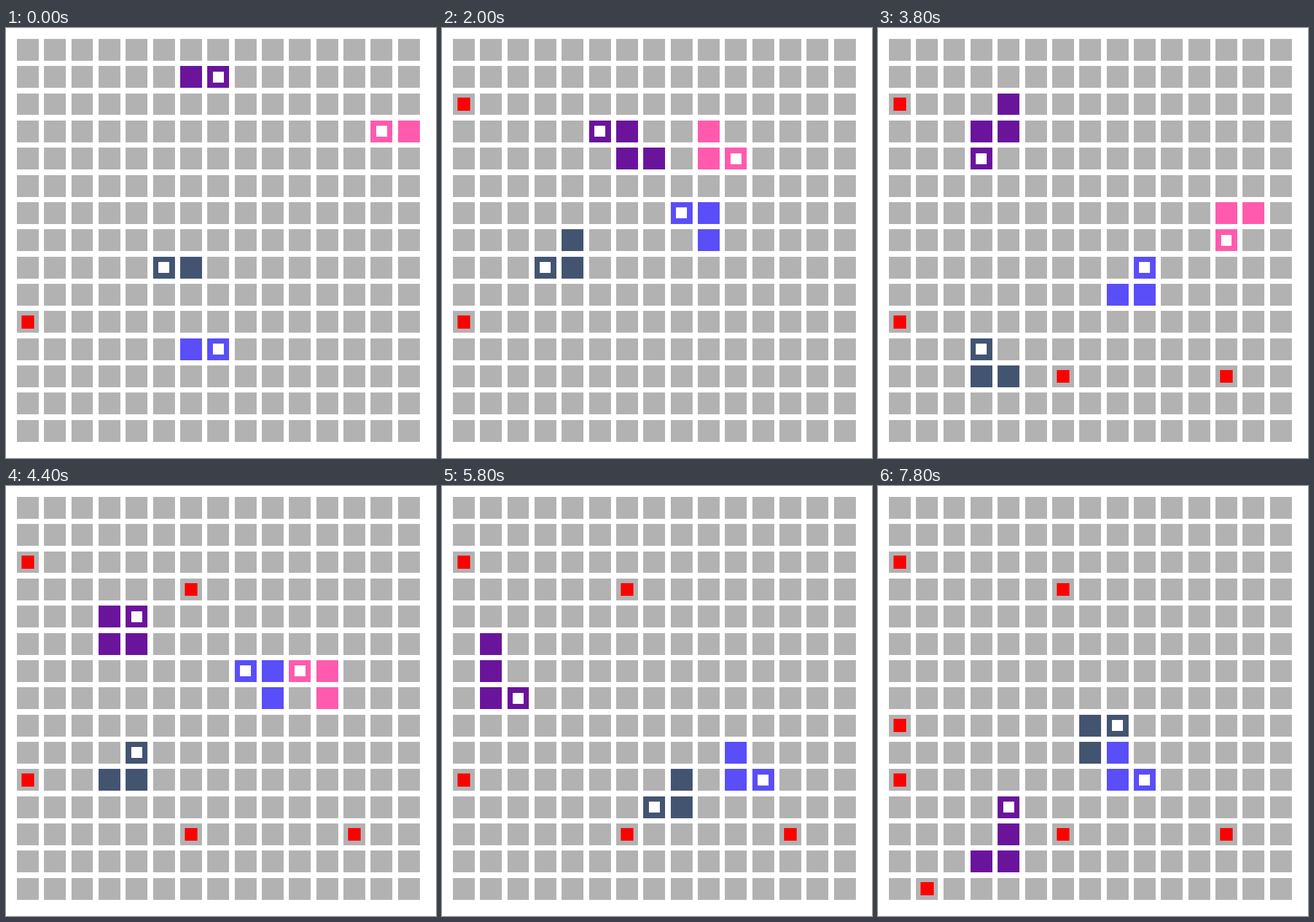
These frames come from a looping animation (748x748 px, 8000 ms). An HTML page with a canvas:

```html
<!DOCTYPE html>
<html lang="en">
<head>
<meta charset="utf-8">
<title>Snakes</title>
<style>
  html, body { margin: 0; width: 100%; height: 100%; overflow: hidden; background: #fff; }
  canvas { display: block; }
</style>
</head>
<body>
<canvas id="stage" width="748" height="748"></canvas>
<script>
const SIZE = 748, CELLS = 15, STEP_MS = 200, STEPS = 40;
const PITCH = SIZE / (CELLS + 0.8), CELL = PITCH * 0.8;
const DIRS = { U: [0, -1], D: [0, 1], L: [-1, 0], R: [1, 0] };
const ctx = document.getElementById('stage').getContext('2d');

// Each snake: first cell, then one move per step; it vanishes when its moves run out.
const snakes = [
  { color: '#6a149c', start: [6, 1], growsAt: 6,
    moves: 'R DDDRD LULUL LDRUU LDLDD RULLD LDDRD DDDDR DRUU' },
  { color: '#ff5aad', start: [14, 3],
    moves: 'L LLLLU RDLDR URDRD RDLDL ULULU LUL' },
  { color: '#435471', start: [6, 8],
    moves: 'L UUULD LDRDL DLDRR DDLUU RURRD RRDLL UURDL URUR' },
  { color: '#594ef7', start: [6, 11],
    moves: 'R RURRU UULUL DDDLD RURUU ULDDD RRDRD LUUUL DLDR' }
];

const food = [
  { cell: [0, 10], from: 0 },
  { cell: [0, 2], from: 7 },
  { cell: [12, 12], from: 12 },
  { cell: [6, 12], from: 17 },
  { cell: [6, 3], from: 22 },
  { cell: [0, 8], from: 32 },
  { cell: [1, 14], from: 37 }
];

function trace({ start, moves }) {
  const path = [start];
  for (const move of moves.replace(/ /g, '')) {
    const [x, y] = path[path.length - 1];
    const [dx, dy] = DIRS[move];
    path.push([x + dx, y + dy]);
  }
  return path;
}

for (const snake of snakes) snake.path = trace(snake);

// Fills a centred square inside a cell, snapped to whole pixels.
function square([col, row], color, scale = 1) {
  const inset = CELL * (1 - scale) / 2;
  const edges = i => {
    const a = PITCH * (i + 0.4) + inset;
    return [Math.round(a), Math.round(a + CELL * scale)];
  };
  const [left, right] = edges(col), [top, bottom] = edges(row);
  ctx.fillStyle = color;
  ctx.fillRect(left, top, right - left, bottom - top);
}

function drawSnake({ path, color, growsAt = Infinity }, step) {
  const head = step + 1;
  if (head >= path.length) return;
  const length = step >= growsAt ? 4 : 3;
  const body = path.slice(Math.max(0, head + 1 - length), head + 1);
  body.forEach(cell => square(cell, color));
  square(path[head], '#fff', 0.5);
}

function draw(step) {
  ctx.fillStyle = '#fff';
  ctx.fillRect(0, 0, SIZE, SIZE);
  for (let row = 0; row < CELLS; row++)
    for (let col = 0; col < CELLS; col++) square([col, row], '#b2b2b2');
  for (const { cell, from } of food)
    if (step >= from) square(cell, '#f00', 0.6);
  for (const snake of snakes) drawSnake(snake, step);
}

const origin = performance.now();
function tick() {
  const elapsed = Math.max(0, performance.now() - origin);
  draw(Math.floor(elapsed / STEP_MS) % STEPS);
  requestAnimationFrame(tick);
}
tick();
</script>
</body>
</html>
```
